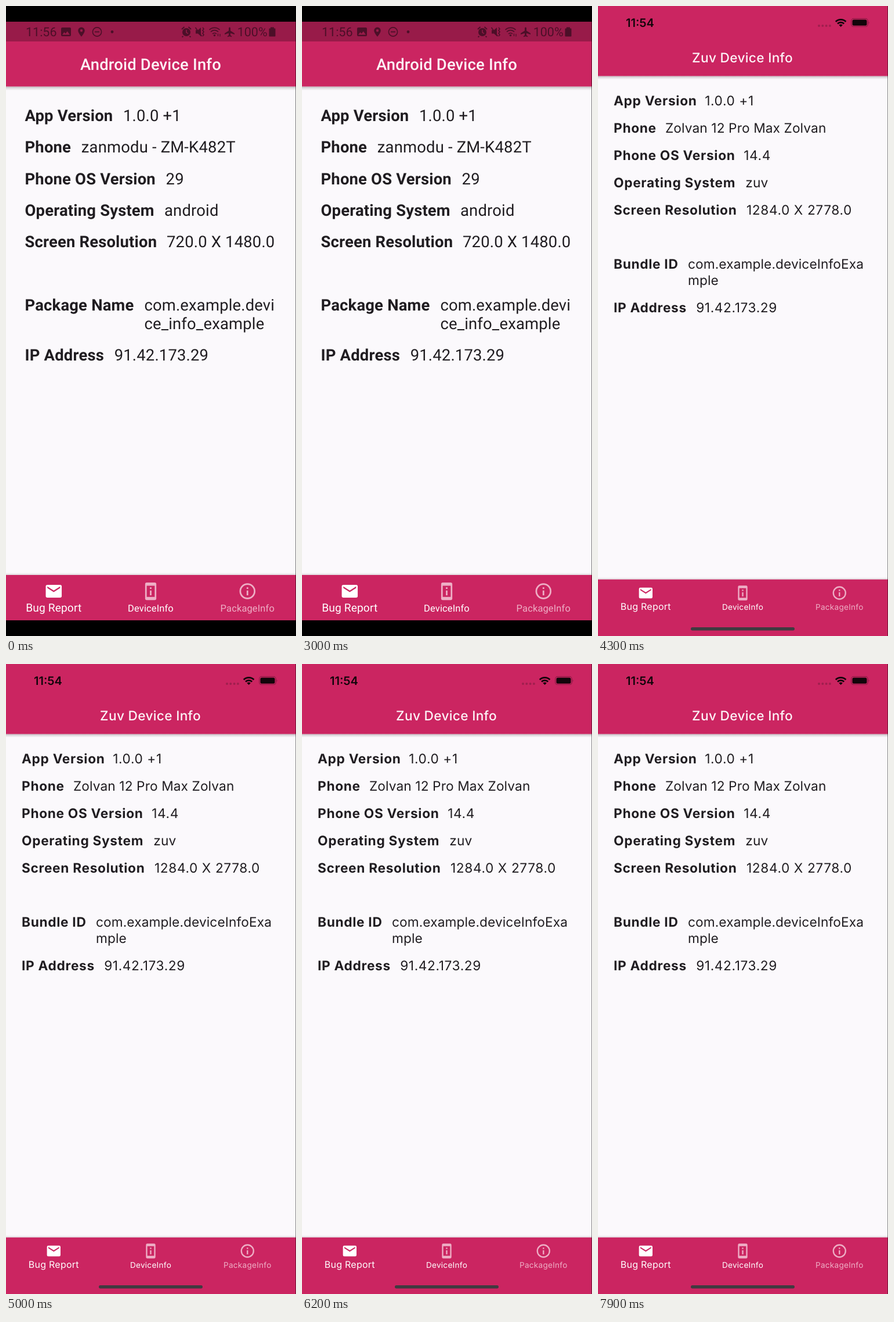
An HTML page that plays this animation: 500x1084 px, repeating every 8 s.

```html
<!DOCTYPE html>
<html lang="en">
<head>
<meta charset="utf-8">
<title>Device info</title>
<style>
  html, body { margin: 0; width: 100%; height: 100%; overflow: hidden; background: #000; }
  svg { position: absolute; left: 0; top: 0; display: block; }
  text { white-space: pre; text-rendering: geometricPrecision; }
  .android { font-family: Roboto, sans-serif; letter-spacing: .19px; }
  .apple { font-family: Inter, sans-serif; letter-spacing: .1px; }
  .apple .num { letter-spacing: .6px; }
  .apple .label { letter-spacing: .68px; }
  .label { font-weight: 700; }
  .title { font-weight: 500; fill: #fdf3f7; text-anchor: middle; }
  .apple .title { letter-spacing: .3px; }
  .body { fill: #201d21; }
  .tab { fill: #fff; text-anchor: middle; }
  .dim { fill: #eeaec5; }
  .android .tab { letter-spacing: .12px; }
  .apple .tab { letter-spacing: .25px; }
  .bar { fill: #cb2561; }
  .page { fill: #fbf9fc; }
</style>
</head>
<body>
<svg width="500" height="1084" viewBox="0 0 500 1084">
  <defs>
    <linearGradient id="shade" x2="0" y2="1">
      <stop offset="0" stop-color="#4a3a42" stop-opacity=".36"/>
      <stop offset=".4" stop-color="#4a3a42" stop-opacity=".15"/>
      <stop offset="1" stop-color="#4a3a42" stop-opacity="0"/>
    </linearGradient>
    <linearGradient id="rise" x2="0" y2="1">
      <stop offset="0" stop-color="#4a3a42" stop-opacity="0"/>
      <stop offset="1" stop-color="#4a3a42" stop-opacity=".16"/>
    </linearGradient>
    <path id="mail" d="M20 4H4a2 2 0 0 0-2 2v12a2 2 0 0 0 2 2h16a2 2 0 0 0 2-2V6a2 2 0 0 0-2-2zm0 4-8 5-8-5V6l8 5 8-5z"/>
    <path id="device" fill-rule="evenodd" d="M13 7h-2v2h2zm0 4h-2v6h2zM17 1H7a2 2 0 0 0-2 2v18a2 2 0 0 0 2 2h10a2 2 0 0 0 2-2V3a2 2 0 0 0-2-2zm0 18H7V5h10z"/>
    <path id="info" fill-rule="evenodd" d="M11 7h2v2h-2zm0 4h2v6h-2zM12 2a10 10 0 1 0 0 20 10 10 0 0 0 0-20zm0 18a8 8 0 1 1 0-16 8 8 0 0 1 0 16z"/>
  </defs>

  <g id="android" class="android">
    <rect width="500" height="1084"/>
    <rect class="page" y="138" width="500" height="841"/>
    <rect y="138.500" width="500" height="7" fill="url(#shade)"/>
    <rect y="975" width="500" height="4" fill="url(#rise)"/>
    <rect class="bar" y="61" width="500" height="77.500"/>
    <rect y="27" width="500" height="34" fill="#981b49"/>
    <rect class="bar" y="979" width="500" height="78"/>

    <g fill="#4c0f28" stroke="none" font-size="21.500" letter-spacing="0">
      <text x="34" y="52">11:56</text>
      <path fill-rule="evenodd" d="M97 37h13q2 0 2 2v11q0 2-2 2H97q-2 0-2-2V39q0-2 2-2zm0 12.500h13l-4.200-6-3.200 4-2.200-2.500z"/>
      <path fill-rule="evenodd" d="M130 36.500a5.800 5.800 0 0 1 5.800 5.800c0 4-5.800 10.500-5.800 10.500s-5.800-6.500-5.800-10.500a5.800 5.800 0 0 1 5.800-5.800zm0 3.600a2.200 2.200 0 1 0 0 4.400 2.200 2.200 0 0 0 0-4.400z"/>
      <circle cx="157" cy="44.500" r="7.600" fill="none" stroke="#4c0f28" stroke-width="1.600"/>
      <rect x="153" y="43.600" width="8" height="1.800"/>
      <circle cx="183" cy="44.500" r="2.400"/>
      <circle cx="311" cy="45" r="7"/>
      <path d="m303 40 4.500-4M319 40l-4.500-4m-9 16-2 1.500m13-1.500 2 1.500" fill="none" stroke="#4c0f28" stroke-width="2"/>
      <path d="M311 41v4.500l3 2" fill="none" stroke="#981b49" stroke-width="1.500"/>
      <path d="M327 41.500h4l5-4.500v15l-5-4.500h-4z"/>
      <path d="m326.500 37 11 15m1.500-15 2 2.500-2 2.500 2 2.500-2 2.500 2 2.500-2 2.500" fill="none" stroke="#4c0f28" stroke-width="1.600"/>
      <path d="M350.500 41a13 13 0 0 1 18 0M353 44.500a9 9 0 0 1 13 0M356 48a5 5 0 0 1 7 0" fill="none" stroke="#4c0f28" stroke-width="1.700"/>
      <circle cx="359.500" cy="50.500" r="1.700"/>
      <path d="M365.500 52v-4.500M369 48v4.500" fill="none" stroke="#4c0f28" stroke-width="1.200"/>
      <path d="M385.500 36.500q1.500 0 1.500 2v4l7 4.500v2l-7-2.300v3.600l2.200 1.700v1.200l-3.700-1-3.700 1V52l2.200-1.700v-3.600l-7 2.300v-2l7-4.500v-4q0-2 1.500-2z"/>
      <text x="398.700" y="52">100%</text>
      <path d="M456 36.500h6v2h1.500q1 0 1 1v12q0 1-1 1h-9q-1 0-1-1v-12q0-1 1-1h1.500z"/>
    </g>

    <text class="title" x="249.500" y="109.700" font-size="27.400">Android Device Info</text>
    <g class="body rows" font-size="27.400"></g>
    <g class="tabs"></g>
    <rect x="499" y="27" width="1" height="1030" opacity=".5"/>
  </g>

  <g id="apple" class="apple">
    <rect class="page" width="500" height="1084"/>
    <rect y="120.500" width="500" height="6" fill="url(#shade)"/>
    <rect y="983" width="500" height="4" fill="url(#rise)"/>
    <rect class="bar" width="500" height="120.500"/>
    <rect class="bar" y="986.700" width="500" height="97.300"/>

    <g fill="#12050a">
      <text x="48" y="36" font-size="20" font-weight="600" letter-spacing="0">11:54</text>
      <g fill="#a01f4e">
        <circle cx="381" cy="34" r="2"/><circle cx="387.300" cy="34" r="2"/>
        <circle cx="393.600" cy="34" r="2"/><circle cx="399.900" cy="34" r="2"/>
      </g>
      <path d="M409.800 27a12.500 12.500 0 0 1 17.600 0M413 30.500a8 8 0 0 1 11.200 0" fill="none" stroke="#12050a" stroke-width="2.800"/>
      <path d="m418.600 36-3.200-3.300a4.600 4.600 0 0 1 6.400 0z"/>
      <rect x="436.700" y="21.700" width="28.600" height="13.800" rx="4" fill="none" stroke="#8c1b45" stroke-width="1.200"/>
      <rect x="438.500" y="23.500" width="25" height="10.200" rx="2.500"/>
      <path d="M466.600 26.500q2 2 0 4.500z" fill="#8c1b45"/>
    </g>

    <text class="title" x="249" y="96.500" font-size="22.700">Zuv Device Info</text>
    <g class="body rows" font-size="22.700"></g>
    <g class="tabs"></g>
    <rect x="160" y="1069" width="179" height="5.500" rx="2.700" fill="#403a40"/>
    <rect x="499" width="1" height="1084" opacity=".45"/>
  </g>
</svg>

<script>
const LOOP = 8000, CUT = 4300;
const NS = 'http://www.w3.org/2000/svg';

function add(parent, tag, attrs, content = '') {
  const el = document.createElementNS(NS, tag);
  for (const key in attrs) el.setAttribute(key, attrs[key]);
  el.textContent = content;
  parent.append(el);
}

// Each row: line slot, label, x of value, value lines
const screens = {
  android: {
    left: 32.5, top: 198.2, step: 54.25, lead: 32.2,
    rows: [
      [0, 'App Version', 202, '1.0.0 +1'],
      [1, 'Phone', 129.8, 'zanmodu - ZM-K482T'],
      [2, 'Phone OS Version', 275.6, '29'],
      [3, 'Operating System', 273, 'android'],
      [4, 'Screen Resolution', 277, '720.0 X 1480.0'],
      [6, 'Package Name', 238.4, 'com.example.devi', 'ce_info_example'],
      [7.594, 'IP Address', 186.7, '91.42.173.29']
    ],
    icon: { y: 1007, scale: 1.375 },
    tabs: { y: 1041.8, big: 19.2, small: 16.5 }
  },
  apple: {
    left: 27, top: 171.2, step: 46.85, lead: 28.1,
    rows: [
      [0, 'App Version', 184.2, '1.0.0 +1'],
      [1, 'Phone', 116, 'Zolvan 12 Pro Max Zolvan'],
      [2, 'Phone OS Version', 251.3, '14.4'],
      [3, 'Operating System', 254.3, 'zuv'],
      [4, 'Screen Resolution', 256, '1284.0 X 2778.0'],
      [6, 'Bundle ID', 155, 'com.example.deviceInfoExa', 'mple'],
      [7.6, 'IP Address', 169.2, '91.42.173.29']
    ],
    icon: { y: 1010, scale: 1.168 },
    tabs: { y: 1039.2, big: 16, small: 13.6 }
  }
};

const tabs = [
  ['mail', 'Bug Report', 82.3, 'tab', 'tab'],
  ['device', 'DeviceInfo', 249.5, 'dim', 'tab'],
  ['info', 'PackageInfo', 416.3, 'dim', 'tab dim']
];

for (const id in screens) {
  const s = screens[id];
  const rows = document.querySelector(`#${id} .rows`);
  const bar = document.querySelector(`#${id} .tabs`);

  for (const [slot, label, x, ...lines] of s.rows) {
    const y = s.top + slot * s.step;
    add(rows, 'text', { x: s.left, y, class: 'label' }, label);
    lines.forEach((line, i) => add(rows, 'text',
      { x, y: y + i * s.lead, class: /^\d/.test(line) ? 'num' : 'value' }, line));
  }

  tabs.forEach(([icon, name, x, iconClass, textClass], i) => {
    add(bar, 'use', {
      href: '#' + icon, class: iconClass,
      transform: `translate(${x} ${s.icon.y}) scale(${s.icon.scale}) translate(-12 -12)`
    });
    add(bar, 'text', {
      x, y: s.tabs.y, class: textClass,
      'font-size': i ? s.tabs.small : s.tabs.big
    }, name);
  });
}

const apple = document.getElementById('apple');
function draw() {
  apple.style.visibility = performance.now() % LOOP < CUT ? 'hidden' : 'visible';
  requestAnimationFrame(draw);
}
draw();
</script>
</body>
</html>
```
